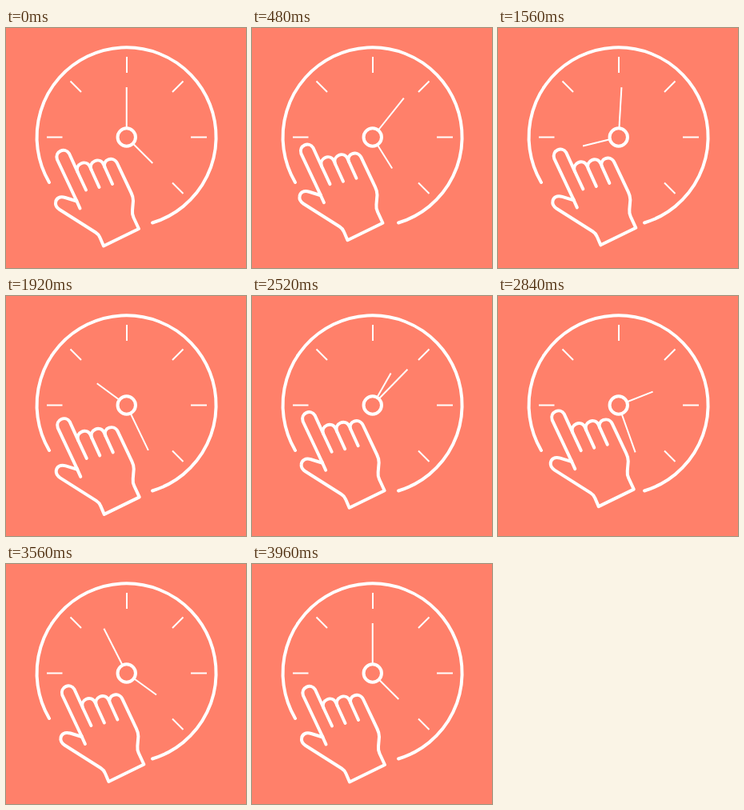
Animation of 300 by 300 pixels, one loop 4 s. Source, as an HTML page:

```html
<!DOCTYPE html>
<html lang="en">
<head>
<meta charset="utf-8">
<title>Clock and hand</title>
<style>
  html, body { margin: 0; width: 100%; height: 100%; overflow: hidden; background: #ff806a; }
  svg { display: block; width: 100vw; height: 100vh; }
  g { fill: none; stroke: #fff; stroke-linecap: round; stroke-linejoin: round; }
  .thin { stroke-width: 2; stroke-linecap: butt; }
  .bold { stroke-width: 4; }
  .solid { fill: #ff806a; }
</style>
</head>
<body>
<svg viewBox="0 0 300 300">
  <g class="thin">
    <path d="M151 36V56M51 136.5H70.5M231 136.5H251M80.5 66.5L94 80M221.500 66.500L208 80M208 193.500L221.500 207"/>
    <path id="minute" d="M0 0V-62.500"/>
    <path id="hour" d="M0 0V-46"/>
  </g>
  <g class="bold">
    <path d="M54 193A112 112 0 1 1 183 243.500"/>
    <circle class="solid" cx="150.750" cy="136.500" r="11.200"/>
    <g id="pointer">
      <path class="solid" d="M88.500 216.500L74 212C67 210 62.500 213 62 218C61.500 222 64 225 67 227L112 255.500Q116 258 117.500 262L122 272.500L166 251L159.500 237Q157.500 233 158 228L159 216Q159 211 156.500 206L139 169C134 159 120 165 123.500 174L122 170.500C117 160.500 103 167 106.500 177L105 173.500C100 163.500 86 170 89.500 180L79 157C74 148.500 60.500 154 64 164.500Z"/>
      <path d="M88 215.500L92.500 225.500M89.500 180L100 202.500M106.500 177L116.500 199M123.500 174L133 195"/>
    </g>
  </g>
</svg>
<script>
  const LOOP = 4000, STEP = 40, SPAN = LOOP - STEP;
  const $ = id => document.getElementById(id);

  // Evenly timed stops of the pointing hand: two uneven laps.
  const stops = [
    [0, 0], [-3, -5.3], [-0.8, -9], [5, -9.3], [7.8, -5], [5.3, -0.2],
    [0, 0], [-1.2, -5], [0.7, -8.8], [5.7, -9], [8.4, -5], [5.5, 0.3]
  ];

  // Closed Catmull-Rom curve through the stops.
  function along(progress) {
    const n = stops.length, pos = progress * n;
    const i = Math.floor(pos), u = pos - i;
    return [0, 1].map(axis => {
      const [a, b, c, d] = [-1, 0, 1, 2].map(k => stops[(i + k + n) % n][axis]);
      return b + u / 2 * (c - a + u * (2 * a - 5 * b + 4 * c - d + u * (3 * (b - c) + d - a)));
    });
  }

  function turn(id, degrees) {
    $(id).setAttribute('transform', `translate(150.75 136.5) rotate(${degrees})`);
  }

  function draw(now) {
    const time = Math.floor((now % LOOP) / STEP) * STEP;
    const progress = time / SPAN;
    const eased = (1 - Math.cos(Math.PI * progress)) / 2;
    turn('minute', 1080 * eased);
    turn('hour', 135 + 360 * eased);
    $('pointer').setAttribute('transform', `translate(${along(progress)})`);
  }

  const start = performance.now();
  function tick() {
    draw(performance.now() - start);
    requestAnimationFrame(tick);
  }
  tick();
</script>
</body>
</html>
```
